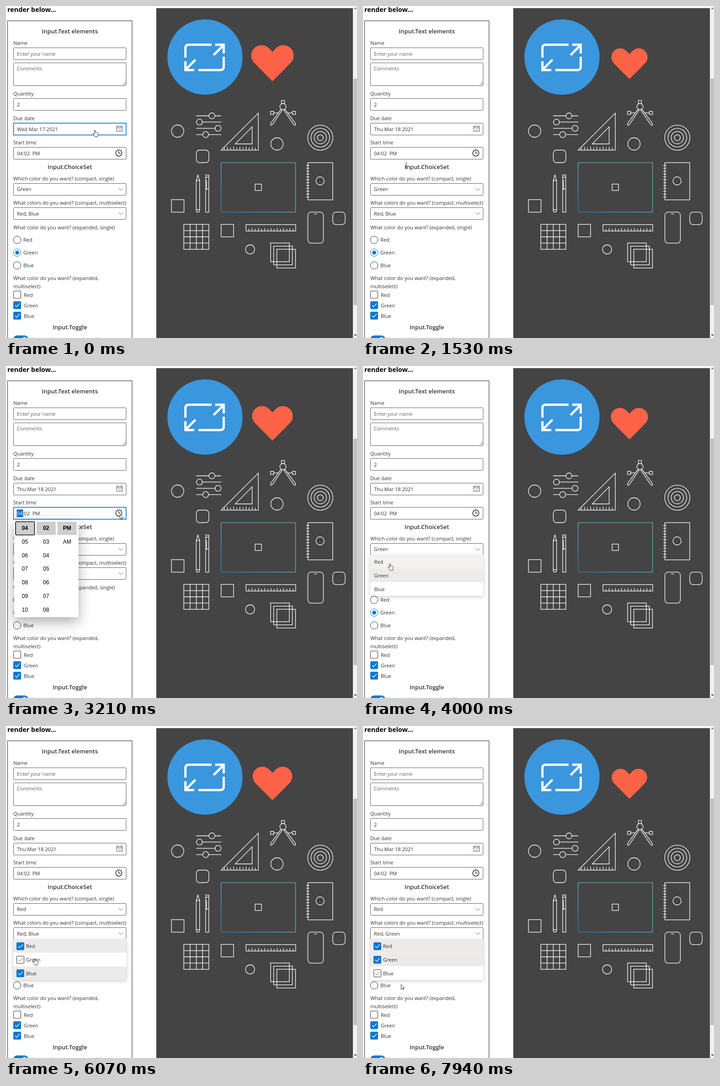
An HTML page for the animation above (8000 ms loop, 770 by 727 pixels).

```html
<!DOCTYPE html>
<html lang="en">
<head>
<meta charset="utf-8">
<title>Form preview</title>
<style>
html, body { margin: 0; width: 100%; height: 100%; overflow: hidden; background: #fff; }
svg { display: block; }
text { font: 11.05px "Open Sans", "Noto Sans", sans-serif; fill: #323130; white-space: pre; }
.title { font-size: 12.9px; font-weight: 600; text-anchor: middle; }
.top { font-size: 14.4px; font-weight: 700; fill: #000; }
.hint { fill: #605e5c; font-size: 10.8px; }
.mid { text-anchor: middle; }
.bold { font-weight: 600; }
.time { font: 12px "Liberation Sans", sans-serif; text-anchor: middle; fill: #000; }
.pick { font-weight: 700; }
.white { fill: #fff; }
.popup { filter: drop-shadow(0 2px 4px rgba(0, 0, 0, .2)); }
.clock { filter: drop-shadow(0 10px 14px rgba(0, 0, 0, .32)); }
</style>
</head>
<body>
<svg width="770" height="727" viewBox="0 0 770 727"><g id="base"></g><g id="live"></g></svg>
<script>
const LOOP = 8000, BLUE = '#0078d4', GREY = '#605e5c', SELECTED = '#edebe9';
const COLORS = ['Red', 'Green', 'Blue'];

const times = (n, fn) => Array.from({ length: n }, (_, i) => fn(i)).join('');
const text = (x, y, s, cls = '') => `<text x="${x}" y="${y}" class="${cls}">${s}</text>`;
const rect = (x, y, w, h, fill = 'none', attrs = '') =>
  `<rect x="${x}" y="${y}" width="${w}" height="${h}" fill="${fill}" ${attrs}/>`;
const circle = (x, y, r, fill = 'none', attrs = '') =>
  `<circle cx="${x}" cy="${y}" r="${r}" fill="${fill}" ${attrs}/>`;
const path = (d, attrs = '') => `<path d="${d}" fill="none" ${attrs}/>`;
const stroke = (color, width = 1) => `stroke="${color}" stroke-width="${width}"`;

const clamp = v => Math.min(1, Math.max(0, v));
const smooth = v => { v = clamp(v); return v * v * (3 - 2 * v); };

// ---------- form ----------
const box = (y, h = 26, focus = false) =>
  rect(16.5, y + .5, 247, h, '#fff', focus ? stroke(BLUE, 1.7) : stroke(GREY) + ' rx="1"');
const chevron = y => path(`M247 ${y - 2.5}l5 5 5-5`, stroke(GREY));
const radio = (y, on) =>
  circle(24.5, y, 8.2, '#fff', stroke(on ? BLUE : '#323130')) + (on ? circle(24.5, y, 4.2, BLUE) : '');

function checkbox(x, y, size, state) {
  const on = state === 'on' || state === 'dark';
  const fill = state === 'dark' ? '#005a9e' : on ? BLUE : '#fff';
  const mark = state === 'off' ? '' :
    path(`M${x + size * .22} ${y + size * .5}l${size * .2} ${size * .2} ${size * .4}-${size * .42}`,
      stroke(on ? '#fff' : GREY, on ? 1.3 : 1));
  return rect(x + .5, y + .5, size - 1, size - 1, fill, stroke(on ? fill : '#323130') + ' rx="1"') + mark;
}

function form() {
  const labels = [[84.5, 'Name'], [195.5, 'Quantity'], [249.5, 'Due date'], [303, 'Start time'],
    [381.5, 'Which color do you want? (compact, single)'],
    [435, 'What colors do you want? (compact, multiselect)'],
    [488.5, 'What color do you want? (expanded, single)'],
    [599.5, 'What color do you want? (expanded,'], [617.5, 'multiselect)']];
  return text(3, 12.5, 'render below...', 'top') +
    rect(3.5, 32.5, 273, 720, 'none', stroke('#222')) +
    text(140, 60, 'Input.Text elements', 'title') +
    text(140, 357, 'Input.ChoiceSet', 'title') +
    text(140, 708, 'Input.Toggle', 'title') +
    labels.map(([y, s]) => text(16, y, s)).join('') +
    box(91) + text(24, 108.5, 'Enter your name', 'hint') +
    box(124, 50) + text(24, 141, 'Comments', 'hint') +
    path('M256 173l7-7M260 173l3-3', stroke(GREY)) +
    box(202) + text(24, 220, '2') +
    COLORS.map((c, i) => radio(512 + 28 * i, i === 1) + text(38, 516 + 28 * i, c)).join('') +
    COLORS.map((c, i) => checkbox(16, 623.6 + 23 * i, 17, i ? 'on' : 'off') + text(39, 636.5 + 23 * i, c)).join('') +
    rect(16, 721.5, 33, 17, BLUE, 'rx="8.5"') + circle(40.5, 730, 5, '#fff') +
    text(56, 734, 'I accept the terms and conditions');
}

// ---------- right panel ----------
function panel() {
  const ticks = (x, step, n, y, len) =>
    times(n, i => `M${x + step * i} ${y}v${-(i % 2 ? len : len * .75)}`);
  const sliders = [[240.5, 451.7], [254.2, 424.3], [267.9, 465.2], [281.6, 438]];
  const arrows = 'M393.6 113V92q0-7.3 7.3-7.3H451M477.6 111V133q0 7.3-7.3 7.3H422' +
    'M459 84.7H477.6V104M455.5 107.5L477.6 85.3M393.6 121V140.3H413M415.7 117.5L393.6 139.7';
  const tools =
    circle(376.5, 274, 13.5) +
    sliders.map(([y, x]) => path(`M417 ${y}H472`) + circle(x, y, 6.5, '#444')).join('') +
    path('M472 315.7H553.5V234.5ZM503 302H540V264.5Z' + ticks(479, 6.8, 11, 315.5, 7)) +
    rect(604.2, 206.8, 6.8, 6.8) + circle(607.6, 220.4, 6.8) +
    rect(580.4, 230.7, 6.8, 6.8) + rect(628.3, 230.7, 6.8, 6.8) +
    path('M587.2 234.1H597M618.4 234.1H628.3M603.5 226L580.6 257V261.5L585 259 606.2 227.2' +
      'M611.8 226L634.8 257V261.5L630.4 259 609 227.2') +
    [28, 21, 14, 7].map(r => circle(689.5, 288.3, r - .5)).join('') +
    circle(594.5, 302, 13.5) +
    rect(417.5, 315.5, 27.5, 27.5, 'none', 'rx="7"') +
    path('M421 370L417.3 382V448q0 3 3.7 3.5 3.7-.5 3.7-3.5V382ZM417.3 382H424.7M417.3 446H424.7') +
    rect(438, 370, 6.8, 81.5) + path('M438 375H444.8M440 381V401H438M438 401H444.8') +
    rect(546.5, 390, 14, 14) +
    rect(662.3, 343, 54.4, 81.5) + path(times(12, i => `M658.5 ${349 + 6.3 * i}h7`)) +
    circle(689, 383, 9) +
    rect(363, 424, 27.5, 27.5) +
    rect(526.5, 478.7, 109, 14) + path(ticks(533, 6.9, 15, 492.5, 6)) +
    rect(472, 478.2, 27.3, 27.3) +
    rect(390, 478.2, 55, 54.6) +
    path(times(3, i => `M${403.8 + 13.7 * i} 478V533M390 ${491.9 + 13.6 * i}H445`)) +
    circle(535.5, 533, 10) +
    times(3, i => rect(580.5 + 6.8 * i, 519 + 6.8 * i, 41, 41)) +
    rect(662.3, 451.3, 34, 68, 'none', 'rx="7"') + path('M676 455.5H682') +
    rect(716.8, 451.3, 27.3, 27.3, 'none', 'rx="7"');
  return rect(329.6, 4.6, 431.4, 723, '#444') +
    rect(761, 0, 9, 727, '#f1f1f1') + rect(762, 159, 8, 496, '#c1c1c1') +
    '<path d="M763.5 719h6l-3 4z" fill="#505050"/><path d="M764 6.5h5l-2.5-3z" fill="#505050"/>' +
    circle(436.5, 111.7, 82.5, '#3a96dd') + path(arrows, stroke('#fff', 5)) +
    `<linearGradient id="edge" x1="0" y1="1" x2="1" y2="0">
      <stop offset="0" stop-color="#2f7fd0"/><stop offset=".45" stop-color="#5ab4dc"/>
      <stop offset="1" stop-color="#6cc08b"/></linearGradient>` +
    rect(471.8, 343, 163.4, 108.3, 'none', stroke('url(#edge)', 1.2)) +
    `<g ${stroke('#fff', 1.3)}>${tools}</g>`;
}

function heart(t) {
  const distance = Math.abs((t / 410 + .5) % 1 - .5) * 2;
  const scale = 1 - .168 * smooth((distance - .2) / .42);
  const lobe = sign => `<path transform="translate(584.5 164.5) rotate(${45 * sign}) scale(${-sign} 1)"
    d="M0 0V-56.5a22.75 22.75 0 0 1 45.5 0V0z"/>`;
  return `<g fill="#ff6347" transform="translate(584.5 133) scale(${scale.toFixed(4)}) translate(-584.5 -133)">
    ${lobe(1)}${lobe(-1)}</g>`;
}

// ---------- popups ----------
const popup = (t, from, to, cls, body) => t < from || t >= to ? '' :
  `<g class="${cls}" opacity="${clamp((t - from + 30) / 150).toFixed(2)}">${body()}</g>`;

function calendar() {
  const months = 'Jan Feb Mar Apr May Jun Jul Aug Sep Oct Nov Dec'.split(' ');
  const col = i => 39 + 23.4 * (i % 7);
  const days = times(35, i => {
    const date = new Date(2021, 1, 28 + i), y = 347 + 23.4 * Math.floor(i / 7);
    const today = i === 17;
    return (today ? circle(col(i), y - 4, 9.5, BLUE) : '') +
      text(col(i), y, date.getDate(), 'mid ' + (today ? 'white' : date.getMonth() === 2 ? '' : 'hint'));
  });
  return rect(16, 283, 367, 209, '#fff') +
    text(30, 305, 'March 2021', 'bold') + text(214, 305, '2021', 'bold') +
    path('M153 304l4-4 4 4M173 299l4 4 4-4M337 304l4-4 4 4M357 299l4 4 4-4', stroke(GREY)) +
    [...'SMTWTFS'].map((d, i) => text(col(i), 326, d, 'mid')).join('') + days +
    path('M200.5 293V482', stroke(SELECTED)) +
    rect(294, 318, 34, 34, SELECTED) +
    months.map((m, i) => text(226 + 42.5 * (i % 4), 339 + 43 * Math.floor(i / 4), m, 'mid')).join('') +
    text(309, 482, 'Go to today');
}

function clockList() {
  const column = (x, first, n) => times(n, i =>
    text(x, 359 + 29.8 * i, String(first + i).padStart(2, '0'), i ? 'time' : 'time pick'));
  return rect(18, 338, 141, 212, '#fff', 'rx="4"') +
    rect(21, 341, 41.5, 29, '#cecece', stroke('#111', 1.6) + ' rx="2"') +
    rect(67, 341, 42, 29, '#cecece') + rect(113, 341, 42, 29, '#cecece') +
    column(41.5, 4, 7) + column(88, 2, 7) +
    text(134, 359, 'PM', 'time pick') + text(134, 388.5, 'AM', 'time');
}

const menu = (top, row) => rect(16, top, 248, 89, '#fff') +
  COLORS.map((c, i) => row(c, i, top + 29.7 * i)).join('');

const singleMenu = () => menu(414, (c, i, y) =>
  rect(16, y, 248, 29.7, ['#f3f2f1', SELECTED, '#fff'][i]) + text(24.5, y + 19.2, c));

function multiMenu(t) {
  const green = t < 5950 ? 'off' : t < 6450 ? 'hint' : 'on';
  const blue = t < 6850 ? 'on' : t < 7280 ? 'dark' : 'hint';
  return menu(467, (c, i, y) => {
    const state = ['on', green, blue][i];
    const picked = state === 'on' || state === 'dark';
    return rect(16, y, 248, 29.7, picked ? SELECTED : '#fff') +
      checkbox(23, y + 6.7, 17, state) + text(44, y + 19.2, c);
  });
}

// ---------- pointer ----------
const SHAPES = {
  arrow: '<path d="M0 0V10.5L2.5 8.3 4.1 11.8 5.7 11.1 4.1 7.7H7.4Z" fill="#fff" stroke="#222" stroke-width=".9"/>',
  beam: path('M-2-6h1.5l.5.5.5-.5H2M0-5.5v11M-2 6h1.5l.5-.5.5.5H2', stroke('#333')),
  hand: `<path d="M-1 0.8q1.2-1.6 2.2 0V5l1-.3 1 .5 1.2-.2 1 .7 1-.1.8 1v3.2L6 12v2.5H.2L-.3 12.6-4 8.4q0-1.7 1.5-1.2L-1 8.4Z"
    fill="#fff" stroke="#222" stroke-width=".9" stroke-linejoin="round"/>`
};
// time, x, y, shape from then on
const ROUTE = [
  [0, 195, 272, 'hand'], [200, 195, 272, 'hand'], [850, 133, 388, 'hand'], [1120, 133, 388, 'arrow'],
  [1480, 95, 350, 'beam'], [1680, 95, 350, 'arrow'], [2200, 250, 325, 'arrow'], [3300, 250, 325, 'arrow'],
  [3620, 120, 402, 'hand'], [3720, 120, 402, 'hand'], [3980, 59, 433, 'hand'], [4450, 59, 433, 'hand'],
  [5100, 263, 455, 'arrow'], [5380, 263, 455, 'arrow'], [5560, 225, 456, 'hand'], [5650, 225, 456, 'hand'],
  [6050, 63, 509, 'hand'], [6550, 63, 509, 'hand'], [6870, 66, 541, 'hand'], [7380, 66, 541, 'hand'],
  [7850, 83.5, 566, 'arrow'], [8000, 83.5, 566, 'arrow']
];

function pointer(t) {
  const i = ROUTE.findIndex(p => p[0] > t);
  const [t0, x0, y0, shape] = ROUTE[i - 1], [t1, x1, y1] = ROUTE[i];
  const k = smooth((t - t0) / (t1 - t0));
  return `<g transform="translate(${x0 + (x1 - x0) * k} ${y0 + (y1 - y0) * k})">${SHAPES[shape]}</g>`;
}

// ---------- changing fields ----------
function fields(t) {
  const picking = t >= 2250 && t < 3300;
  const several = t < 6450 ? 'Red, Blue' : t < 7280 ? 'Red, Green, Blue' : 'Red, Green';
  return box(256, 26, t < 1150) + text(24, 273.5, t < 1120 ? 'Wed Mar 17 2021' : 'Thu Mar 18 2021') +
    rect(242.5, 263.5, 13, 11, 'none', stroke(GREY)) +
    path('M242.5 266.5H255.5M245.5 262V265M252.5 262V265', stroke(GREY)) +
    path('M245 269.3H254M245 272H254', stroke(GREY) + ' stroke-dasharray="1.2 1.2"') +
    box(309, 26, picking) +
    (picking ? rect(23.5, 314, 14, 17, BLUE) : '') +
    text(24, 326.5, `<tspan class="${picking ? 'white' : ''}">04</tspan>:02  PM`) +
    circle(247.5, 322, 6.8, '#fff', stroke('#111', 1.3)) + path('M247.5 317.5V322.5H251.5', stroke('#111', 1.2)) +
    box(388) + text(24, 405, t < 4450 ? 'Green' : 'Red') + chevron(401) +
    box(441) + text(24, 458.5, several) + chevron(454);
}

const base = document.getElementById('base'), live = document.getElementById('live');
base.innerHTML = form() + panel();

const start = performance.now();
function draw() {
  const t = (performance.now() - start) % LOOP;
  live.innerHTML = fields(t) + heart(t) +
    popup(t, 250, 1150, 'popup', calendar) +
    popup(t, 2250, 3300, 'clock', clockList) +
    popup(t, 3700, 4450, 'popup', singleMenu) +
    popup(t, 5600, LOOP, 'popup', () => multiMenu(t)) +
    pointer(t);
  requestAnimationFrame(draw);
}
draw();
</script>
</body>
</html>
```
